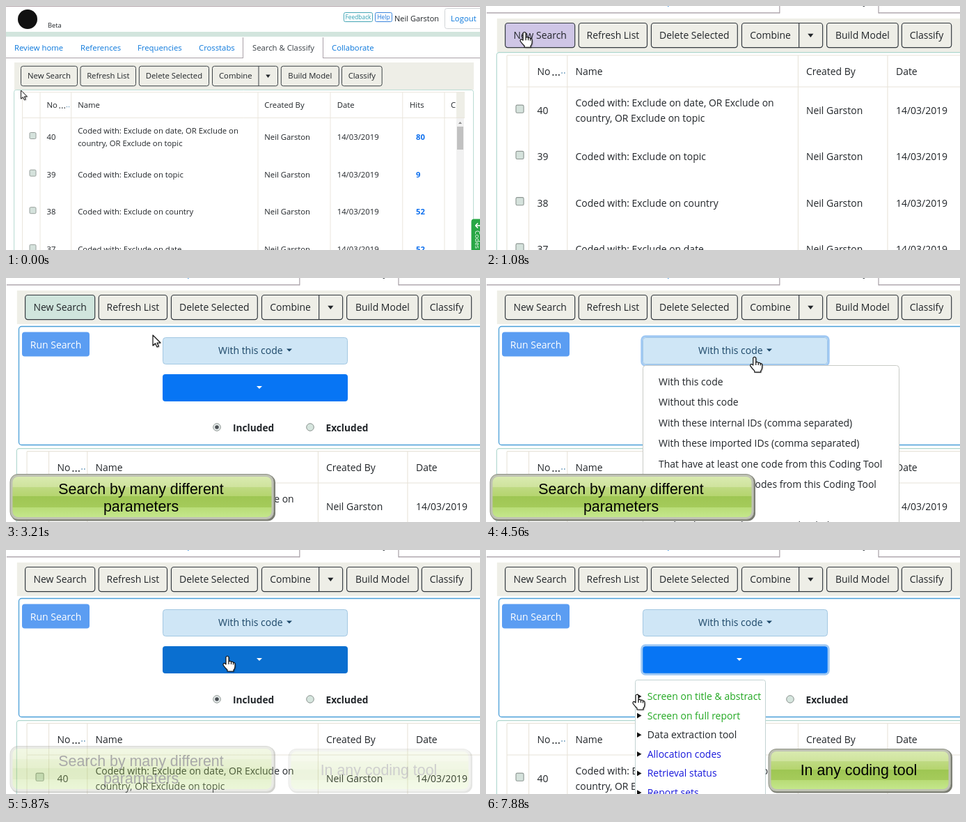
Recreate the animation shown at these times as an HTML page with a canvas. Size 681 px wide and 350 px high, loop 8000 ms.

```html
<!DOCTYPE html>
<html lang="en">
<head>
<meta charset="utf-8">
<title>Search and classify</title>
<style>
html, body { margin: 0; width: 100%; height: 100%; overflow: hidden; background: #fff; }
canvas { display: block; width: 681px; height: 350px; }
</style>
</head>
<body>
<canvas id="stage" width="681" height="350"></canvas>
<script>
const stage = document.getElementById('stage').getContext('2d');
let ctx = stage;
const LOOP = 8000, ZOOM = 0.236, LIFT = -82.2, PANEL = 144;
const SANS = '"Open Sans", "Noto Sans", sans-serif';
const ARIAL = '"Liberation Sans", Arial, sans-serif';
const INK = '#212529', LINK = '#0b78dc', USER = 'Neil Garston';

// Share of a stepped change done at t: n steps from first to last
function ramp(t, first, last, n) {
  const gap = (last - first) / (n - 1);
  const k = Math.floor((t - first) / gap + 0.001) + 1;
  return Math.max(0, Math.min(n, k)) / n;
}

function text(s, x, y, size = 11.3, color = INK, weight = 400, align = 'left', family = SANS) {
  ctx.font = `${weight} ${size}px ${family}`;
  ctx.fillStyle = color;
  ctx.textAlign = align;
  ctx.fillText(s, x, y + size * 0.35);
}

function box(x, y, w, h, r, fill, stroke, width = 1) {
  ctx.beginPath();
  ctx.roundRect(x, y, w, h, r);
  if (fill) { ctx.fillStyle = fill; ctx.fill(); }
  if (stroke) { ctx.strokeStyle = stroke; ctx.lineWidth = width; ctx.stroke(); }
}

function line(x1, y1, x2, y2, color, width = 0.9) {
  ctx.beginPath();
  ctx.moveTo(x1, y1);
  ctx.lineTo(x2, y2);
  ctx.strokeStyle = color;
  ctx.lineWidth = width;
  ctx.stroke();
}

function tri(x1, y1, x2, y2, x3, y3, color) {
  ctx.beginPath();
  ctx.moveTo(x1, y1);
  ctx.lineTo(x2, y2);
  ctx.lineTo(x3, y3);
  ctx.fillStyle = color;
  ctx.fill();
}

const caret = (x, y, r, color) => tri(x - r, y - r / 2, x + r, y - r / 2, x, y + r / 2, color);

function rect(x, y, w, h, color) {
  ctx.fillStyle = color;
  ctx.fillRect(x, y, w, h);
}

// Pointer

const HAND = new Path2D('M-2 12V1.5Q0-1 2 1.5V8Q4 6.5 5.5 8.5Q7.5 7.5 8.5 9.5Q11 9 11 12V15Q11 18 9 20V22H0V20Q-4 16-6 13Q-6 10-4 10.5Z');
const FOLDS = new Path2D('M2 8V12M5.5 8.5V12M8.5 9.5V12.5');
const ARROW = new Path2D('M0 0V15L3.5 11.8L6 17L8.4 16L6 11H11Z');

const moves = [
  { first: 900, last: 1140, n: 5, a: [28, 67], c: [45, 48], b: [62, 30] },
  { first: 3030, last: 3450, n: 8, a: [62, 30], c: [191, 93], b: [400, 112] },
  { first: 4560, last: 4930, n: 6, a: [400, 112], c: [357, 112], b: [318, 152] },
  { first: 7040, last: 7820, n: 14, a: [318, 152], c: [262, 285], b: [212, 209] }
];

function pointerAt(t, cam) {
  let pos = [21.5 * cam.k + cam.x, 121 * cam.k + cam.y];
  for (const m of moves) {
    if (t < m.first) break;
    const p = ramp(t, m.first, m.last, m.n), q = 1 - p;
    pos = m.a.map((v, i) => q * q * v + 2 * p * q * m.c[i] + p * p * m.b[i]);
  }
  return t >= 7880 ? [217, 207] : pos;
}

const inside = ([x, y], l, t, r, b) => x >= l && x <= r && y >= t && y <= b;

function drawPointer([x, y], hand, scale) {
  ctx.save();
  ctx.translate(x, y);
  ctx.scale(scale, scale);
  ctx.shadowColor = 'rgba(0,0,0,.4)';
  ctx.shadowBlur = 2;
  ctx.shadowOffsetX = ctx.shadowOffsetY = 1;
  ctx.fillStyle = '#fff';
  ctx.fill(hand ? HAND : ARROW);
  ctx.shadowColor = 'transparent';
  ctx.strokeStyle = '#111';
  ctx.lineWidth = 1.2;
  ctx.lineJoin = 'round';
  ctx.stroke(hand ? HAND : ARROW);
  if (hand) ctx.stroke(FOLDS);
  ctx.restore();
}

// Page, in unzoomed units

function drawHeader() {
  rect(0, 0, 681, 1, '#b3a4aa');
  ctx.beginPath();
  ctx.arc(31, 19, 14, 0, Math.PI * 2);
  ctx.fillStyle = '#111';
  ctx.fill();
  text('Beta', 60, 28, 9.3);
  box(485.5, 9.5, 41, 13, 2, '#fff', '#45a5b5');
  text('Feedback', 506, 16, 8.4, '#2b9fb2', 400, 'center');
  box(530.5, 9.5, 24, 13, 2, '#fff', '#3b85dc');
  text('Help', 542.5, 16, 8.4, '#1673dd', 400, 'center');
  text(USER, 558, 18, 11);
  box(630.5, 3.5, 60, 29, 3, '#fff', '#d2d5d8');
  text('Logout', 639, 18, 11.3, LINK);
  rect(0, 37, 700, 7, '#d2e5dd');
  const tabs = [['Review home', 12], ['References', 107], ['Frequencies', 189],
    ['Crosstabs', 277], ['Search & Classify', 354], ['Collaborate', 468]];
  for (const [s, x] of tabs) text(s, x, 60, 11.3, x === 354 ? '#3a4046' : LINK);
  const edge = '#a1979f';
  line(0, 74.5, 340.5, 74.5, edge);
  line(340.5, 45, 340.5, 74.9, edge);
  line(455.5, 45, 455.5, 74.9, edge);
  line(455.5, 74.5, 700, 74.5, edge);
}

function drawToolbar(firstFill) {
  const face = '#eeeee7';
  rect(12, 81, 660, 39, face);
  const buttons = [['New Search', 21.5, 81], ['Refresh List', 107, 79.5], ['Delete Selected', 191.3, 100.2],
    ['Combine', 296.5, 66.5], ['Build Model', 395.3, 83], ['Classify', 482.5, 57.7]];
  buttons.forEach(([s, x, w], i) => {
    const full = s === 'Combine' ? 94 : w;
    box(x, 86.3, full, 28.4, 3, i ? face : firstFill, '#343a40', 0.95);
    text(s, x + w / 2, 100.5, 11.3, INK, 400, 'center');
  });
  line(363, 86.3, 363, 114.7, '#343a40', 0.95);
  tri(373.2, 98.6, 379.8, 98.6, 376.5, 103, INK);
}

function drawTable() {
  const rule = '#e8e4da';
  box(11.6, 120.4, 660, 300, 3, '#fff', '#aed6cd', 0.9);
  rect(647, 124, 12, 37, '#eeeee7');
  line(23.5, 123.7, 659, 123.7, rule);
  line(23.5, 160.4, 659, 160.4, rule);
  for (const x of [23.5, 49, 93.7, 362, 466, 569.8, 630]) line(x, 124, x, 400, rule);
  text('No', 58.6, 142.5);
  text('...', 75.5, 142.5, 13);
  text('··', 86, 144.5, 11.3, '#5d91b5');
  text('Name', 103.2, 142.5);
  text('Created By', 371.3, 142.5);
  text('Date', 475.7, 142.5);
  text('Hits', 580, 142.5);
  ctx.save();
  ctx.beginPath();
  ctx.rect(630, 124, 16.5, 40);
  ctx.clip();
  text('Codes', 639, 142.5);
  ctx.restore();

  const rows = [['date, OR Exclude on', 80], ['topic', 9], ['country', 52], ['date', 52]];
  rows.forEach(([what, hits], i) => {
    const y = 188 + i * 53.6;
    box(34, y - 6.5, 9, 9, 1.5, '#d5e2dc', '#8f9894', 0.9);
    text(String(40 - i), 58.6, y);
    text('Coded with: Exclude on ' + what, 103.2, i ? y : y - 9);
    if (!i) text('country, OR Exclude on topic', 103.2, y + 9);
    text(USER, 371.3, y);
    text('14/03/2019', 475.7, y);
    text(String(hits), 589, y, 11.3, '#0d6fee', 700);
  });

  rect(647, 161, 11, 260, '#f1f1f1');
  tri(650, 169, 655, 169, 652.5, 166, '#8a8a8a');
  rect(648, 173, 9, 33, '#c1c1c1');
}

function drawCodesTab() {
  box(668.5, 305.5, 30, 80, 4, '#28a745');
  line(675, 315, 681, 315, '#fff', 1.6);
  line(678, 311.5, 674.5, 315, '#fff', 1.6);
  line(678, 318.5, 674.5, 315, '#fff', 1.6);
  ctx.save();
  ctx.translate(677, 322);
  ctx.rotate(Math.PI / 2);
  text('Codes', 0, 0, 9, '#fff');
  ctx.restore();
}

// Search panel, in stage units

function ring(x, y, w, h, alpha) {
  if (alpha <= 0) return;
  ctx.globalAlpha = alpha;
  box(x - 1.2, y - 1.2, w + 2.4, h + 2.4, 5, null, '#9fc8f3', 3);
  ctx.globalAlpha = 1;
}

function radio(x, y, on) {
  ctx.beginPath();
  ctx.arc(x, y, 5.3, 0, 7);
  ctx.fillStyle = on ? '#e9eeee' : '#d6e5de';
  ctx.fill();
  ctx.strokeStyle = '#8b9490';
  ctx.lineWidth = 1;
  ctx.stroke();
  if (!on) return;
  ctx.beginPath();
  ctx.arc(x, y, 2.8, 0, 7);
  ctx.fillStyle = '#4b5055';
  ctx.fill();
}

function drawPanel(ring1, ring2, hover) {
  box(18.5, 69.5, 700, 170, 4, '#fff', '#4a9fd8', 1.3);
  box(23, 77.5, 97, 35, 4, '#5b9df2');
  text('Run Search', 71.5, 96, 14, '#fff', 400, 'center');
  box(225.5, 85.5, 265, 38, 4, '#cfe6f6', '#a3c8e2');
  ring(225, 85, 266, 39, ring1);
  text('With this code', 305, 104.5, 14, '#1c4768');
  caret(407, 103.5, 4, '#1c4768');
  box(225, 138, 266, 39, 4, hover ? '#0a6fd0' : '#0775f4');
  ring(225, 138, 266, 39, ring2);
  caret(364, 157, 4, '#fff');
  radio(303, 214, true);
  text('Included', 326, 215, 13.7, INK, 700);
  radio(437, 214, false);
  text('Excluded', 459.5, 215, 13.7, INK, 700);
}

function drawCriteria() {
  box(225.5, 125.5, 368, 300, 4, '#fff', '#c9cbc6');
  ['With this code', 'Without this code', 'With these internal IDs (comma separated)',
    'With these imported IDs (comma separated)', 'That have at least one code from this Coding Tool',
    "That don't have any codes from this Coding Tool", 'Containing this text',
    'With at least one document uploaded'
  ].forEach((s, i) => text(s, 248, 149 + i * 29.5, 14));
}

function drawTools() {
  box(214.5, 186.5, 187, 240, 3, '#fff', '#c3d3d3');
  const green = '#22a822', blue = '#1818dc';
  [['Screen on title & abstract', green], ['Screen on full report', green],
    ['Data extraction tool', INK], ['Allocation codes', blue],
    ['Retrieval status', blue], ['Report sets', blue]
  ].forEach(([s, color], i) => {
    const y = 210 + i * 27.6;
    tri(217, y - 3.8, 223.5, y, 217, y + 3.8, '#111');
    text(s, 231.7, y, 14, color);
  });
}

// Captions are painted once on their own layer, so that they fade as a whole
function makeCaption(x, y, w, h, lines) {
  const layer = document.createElement('canvas');
  layer.width = 681;
  layer.height = 350;
  ctx = layer.getContext('2d');
  box(x + 1, y + 1, w, h, 11, '#77796f');
  box(x, y, w - 1, h - 1, 11, '#bfc2b4', '#8d9085');
  const g = ctx.createLinearGradient(0, y, 0, y + h);
  [[0, '#dbecb4'], [0.28, '#cfe39d'], [0.28, '#bfda83'], [0.48, '#b5d46e'], [0.48, '#9ec653'],
    [0.72, '#a5cb5b'], [0.72, '#b8dc76'], [1, '#c8ea92']].forEach(s => g.addColorStop(...s));
  box(x + 3.5, y + 3.5, w - 8, h - 8, 8, g);
  lines.forEach(([s, ty]) => text(s, x + w / 2 - 2, ty, 21.4, '#000', 400, 'center', ARIAL));
  ctx = stage;
  return layer;
}

const captions = [
  makeCaption(6, 281.5, 380, 66, [['Search by many different', 302.5], ['parameters', 327.5]]),
  makeCaption(406, 285.5, 263, 62, [['In any coding tool', 316]])
];

function drawCaption(layer, alpha) {
  ctx.globalAlpha = alpha;
  ctx.drawImage(layer, 0, 0);
  ctx.globalAlpha = 1;
}

function draw(t) {
  const z = ramp(t, 60, 840, 14), e = 1 - (1 - z) ** 1.95;
  const cam = { k: 1 + ZOOM * e, x: e, y: LIFT * e };
  const panel = t >= 1870;
  const menu1 = t >= 3980 && t < 5330, menu2 = t >= 6530;
  const at = pointerAt(t, cam);
  const onNew = t >= 900 && inside(at, 27, 24, 127, 60);
  const onFirst = panel && inside(at, 225, 85, 491, 124);
  const onSecond = panel && !menu1 && inside(at, 225, 138, 491, 177);
  const onItem = menu1 && inside(at, 226, 126, 593, 350);
  const focus = panel && t < 3980;

  rect(0, 0, 681, 350, '#fff');
  ctx.save();
  ctx.translate(cam.x, cam.y);
  ctx.scale(cam.k, cam.k);
  drawHeader();
  drawToolbar(onNew ? '#cfc6e6' : focus ? '#d0e5dd' : '#eeeee7');
  if (panel) ctx.translate(0, PANEL);
  drawTable();
  if (!panel) drawCodesTab();
  ctx.restore();

  if (panel) {
    const ring1 = ramp(t, 3980, 4160, 4) - ramp(t, 5330, 5510, 4);
    drawPanel(ring1, ramp(t, 6530, 6710, 4), onSecond);
    if (menu1) drawCriteria();
    if (menu2) drawTools();
  }
  drawCaption(captions[0], ramp(t, 1870, 2770, 16) - ramp(t, 5330, 6170, 15));
  drawCaption(captions[1], ramp(t, 5750, 6650, 16));
  drawPointer(at, onNew || onFirst || onSecond || onItem || t >= 7880, cam.k / (1 + ZOOM));
}

const start = performance.now();
function tick() {
  draw((performance.now() - start) % LOOP);
  requestAnimationFrame(tick);
}
tick();
</script>
</body>
</html>
```
